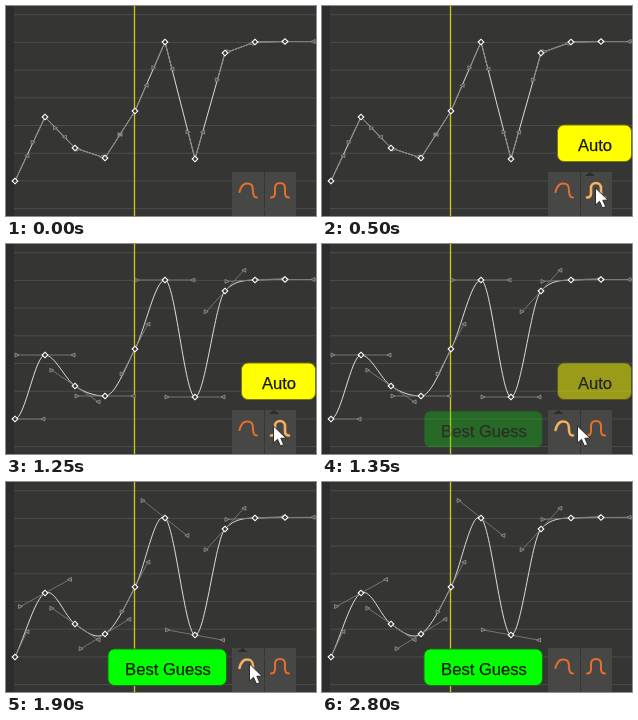
Write an HTML page that moves like this. It is 310x210 px and loops after 3000 ms.

```html
<!DOCTYPE html>
<html lang="en">
<head>
<meta charset="utf-8">
<title>Curve handles</title>
<style>
  html, body { margin: 0; width: 100%; height: 100%; overflow: hidden; background: #353633; }
  svg { display: block; width: 100vw; height: 100vh; }
  text {
    font: 16.6px "Liberation Sans", Arial, sans-serif;
    text-anchor: middle; fill: #171800; stroke: #171800; stroke-width: .25;
  }
</style>
</head>
<body>
<svg viewBox="0 0 310 210" fill="none">
  <rect width="310" height="210" fill="#353633"/>
  <path id="grid" stroke="#4b4c48"/>
  <path d="M128.5 0V210" stroke="#d2c716" stroke-width="1.3"/>
  <path id="curve" stroke="#e4e4e1" stroke-width=".95"/>
  <path id="arms" stroke="#7c7d79" stroke-width=".9"/>
  <path id="tips" stroke="#959692" stroke-width=".8" fill="#484945"/>
  <rect width="8" height="210" fill="#2b2c2e"/>
  <path id="keys" stroke="#fff" stroke-width="1.1" fill="#353633"/>
  <path d="M226 166h32v44h-32zM259 166h31v44h-31z" fill="#474746"/>
  <path id="notch" d="M-5 170L0 166L5 170Z" fill="#2c2d2b"/>
  <g stroke-linecap="round" stroke-linejoin="round">
    <path id="soft" d="M233.5 186C235 180 237.5 177.500 241 177.500C246 177.500 247 180 247 185C247 189 247.500 191.500 251 191.500"/>
    <path id="round" d="M265 191.500C268 191.500 269 190 269 187V182C269 179 271 177 274 177C277 177 279 179 279 182V187C279 190 280 191.500 283 191.500"/>
  </g>
  <g id="auto">
    <rect x="235.500" y="119" width="74" height="36.500" rx="6.500" fill="#ff0" stroke="#77770f"/>
    <text x="273" y="144.500">Auto</text>
  </g>
  <g id="guess">
    <rect x="102" y="167" width="118.500" height="36.500" rx="6.500" fill="#0f0" stroke="#1b6d1b"/>
    <text x="162" y="192.500">Best Guess</text>
  </g>
  <path id="cursor" d="M0 0V17L4 13.300L7 20L10.200 18.600L7.300 12.200H12.500Z" fill="#fff" stroke="#222" stroke-width=".9"/>
</svg>
<script>
const LOOP = 3000, STEP = 50;
const GAP = 30, ARM = 28;
const ys = [175, 111, 142, 152, 105, 36, 153, 47, 36, 35.5, 35.5];
const last = ys.length - 1;
const keyX = i => 9 + GAP * i;

const $ = id => document.getElementById(id);
const set = (id, attrs) => {
  for (const name in attrs) $(id).setAttribute(name, attrs[name]);
};
const ramp = (t, from, to) => Math.max(0, Math.min(1, (t - from) / (to - from)));

// Slope of segment i; the outermost segments repeat past the ends
const chord = i => {
  const k = Math.max(0, Math.min(last - 1, i));
  return (ys[k + 1] - ys[k]) / GAP;
};

// Mean slope, limited where the curve keeps its direction; peaks are level unless tilted
function tangent(i, tilt) {
  const a = chord(i - 1), b = chord(i), mean = (a + b) / 2;
  if (i === 0 || i === last || a * b <= 0) return tilt ? mean : 0;
  return Math.sign(mean) * Math.min(Math.abs(mean), 3 * Math.abs(a), 3 * Math.abs(b));
}

// slope(i, side): tangent on the left (-1) or right (1) of key i
function makePose(slope) {
  let curve = `M${keyX(0)} ${ys[0]}`, arms = "", tips = "";
  ys.forEach((y, i) => {
    const x = keyX(i);
    for (const side of [-1, 1]) {
      const m = slope(i, side), dx = side * ARM / Math.hypot(1, m);
      const u = x + dx, v = y + dx * m;
      arms += `M${x} ${y}L${u} ${v}`;
      tips += `M${u + side * 2} ${v - 2}L${u - side * 2} ${v}L${u + side * 2} ${v + 2}Z`;
    }
    if (i < last) {
      const d = GAP / 3, u = x + GAP, v = ys[i + 1];
      curve += `C${x + d} ${y + d * slope(i, 1)} ${u - d} ${v - d * slope(i + 1, -1)} ${u} ${v}`;
    }
  });
  return { curve, arms, tips };
}

const linear = makePose((i, side) => chord(side < 0 ? i - 1 : i));
const level = makePose(i => tangent(i, false));
const tilted = makePose(i => tangent(i, true));

function render(ms) {
  const t = Math.floor((ms % LOOP) / STEP) * STEP;
  const pose = t < 650 ? linear : t < 1800 ? level : tilted;
  for (const id in pose) set(id, { d: pose[id] });

  const enter = ramp(t, 250, 400), cross = ramp(t, 1200, 1450), leave = ramp(t, 2700, 2750);
  const x = 300.5 - 27 * enter - 30 * cross;
  const y = 188 - 6 * enter + 14 * leave;
  const shown = t >= 250 && t < 2800;
  const onSoft = shown && x < 258.5;
  const onRound = shown && !onSoft && x < 290;
  const icon = lit => ({ stroke: lit ? "#f5b063" : "#e56f2c", "stroke-width": lit ? 2.6 : 2 });

  set("cursor", { transform: `translate(${x} ${y})`, opacity: +shown });
  set("soft", icon(onSoft));
  set("round", icon(onRound));
  set("notch", { transform: `translate(${onSoft ? 236.5 : 268})`, opacity: +(onSoft || onRound) });
  set("auto", { opacity: ramp(t, 300, 500) * (1 - ramp(t, 1250, 1450)) });
  set("guess", { opacity: ramp(t, 1300, 1500) });
}

let grid = "";
for (let y = 8.7; y < 210; y += 27.7) grid += `M8 ${y}H310`;
set("grid", { d: grid });
set("keys", {
  d: ys.slice(0, last).map((y, i) => `M${keyX(i) - 2.8} ${y}l2.8-2.8 2.8 2.8-2.8 2.8z`).join("")
});

const start = performance.now();
function tick() {
  render(performance.now() - start);
  requestAnimationFrame(tick);
}
tick();
</script>
</body>
</html>
```
